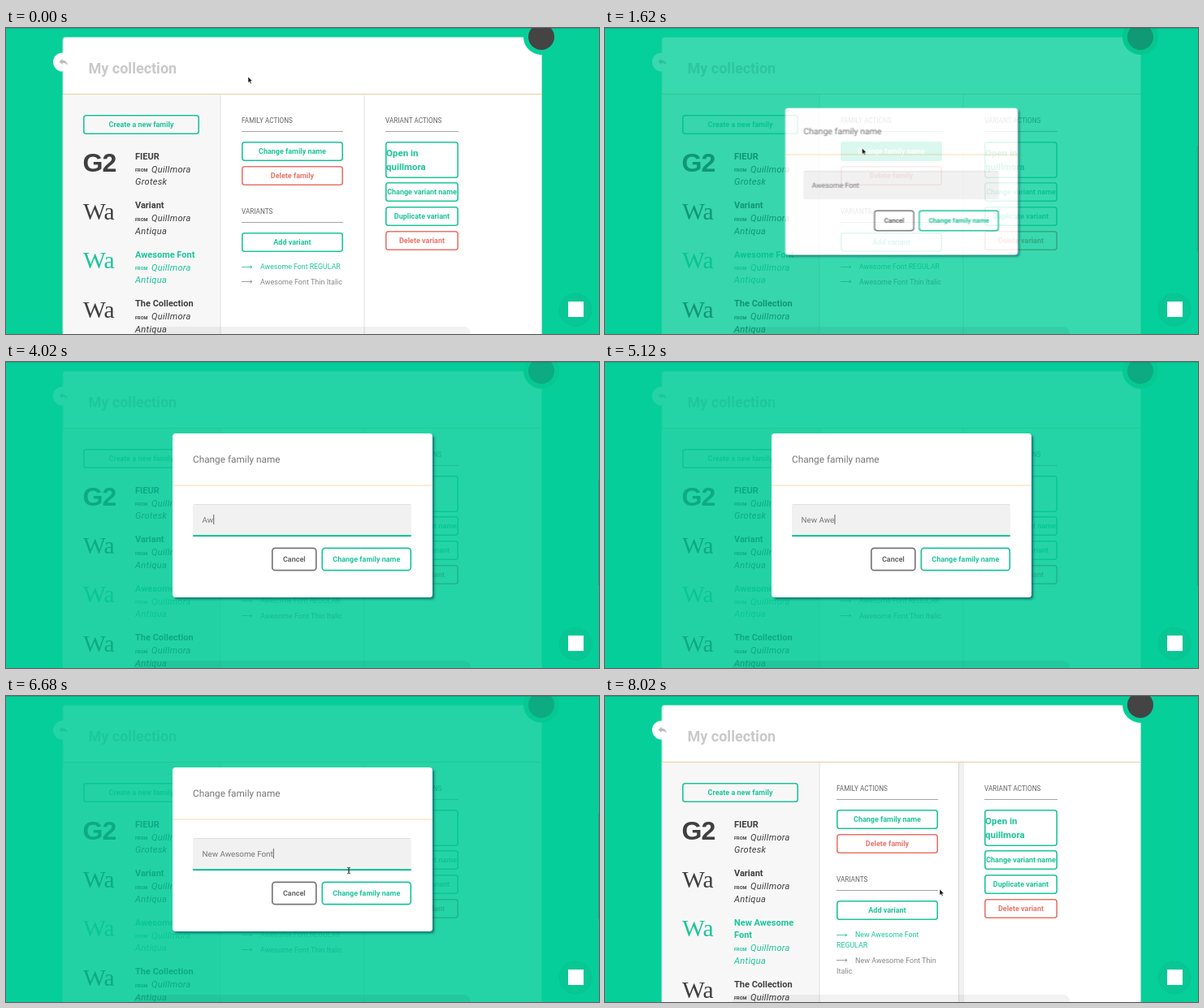
Write an HTML page that moves like this. It is 730 px wide and 377 px high and loops after 8040 ms.

```html
<!DOCTYPE html>
<html lang="en">
<head>
<meta charset="utf-8">
<title>Rename a font family</title>
<style>
html, body { margin: 0; width: 100%; height: 100%; overflow: hidden; background: #06cf9a; }
svg { display: block; width: 730px; height: 377px; font-family: Roboto, "Open Sans", sans-serif; }
text { white-space: pre; }
.bold { font-weight: 600; }
.mid { text-anchor: middle; }
.it { font-style: italic; letter-spacing: .3px; }
.serif { font-family: "Liberation Serif", serif; }
.sans { font-family: "Liberation Sans", sans-serif; font-weight: 700; letter-spacing: -1px; }

.before, .after, .hover, .veil, .residue, .glimpse, .modal, .focus, .fill, .label, .pointer, .arrow, .hand, .beam {
  animation: 8040ms linear infinite;
}
.before { animation-name: before; }
.after { visibility: hidden; animation-name: after; }
.hover { opacity: 0; animation-name: hover; }
.veil { animation-name: veil; }
.residue { mix-blend-mode: multiply; animation-name: residue; }
.glimpse { mix-blend-mode: multiply; animation-name: glimpse; }
.modal { transform-origin: 365px 189px; text-rendering: geometricPrecision; animation-name: modal; }
.focus { animation-name: focus; }
.fill { animation-name: fill; }
.label { animation-name: label; }
.pointer { animation-name: pointer; animation-timing-function: ease-in-out; }
.arrow, .hand, .beam { animation-timing-function: step-end; }
.arrow { animation-name: arrow; }
.hand { animation-name: hand; }
.beam { animation-name: beam; }

@keyframes before { 0%, 94% { visibility: visible; } 94.01%, 100% { visibility: hidden; } }
@keyframes after { 0%, 94% { visibility: hidden; } 94.01%, 100% { visibility: visible; } }
@keyframes hover { 0%, 11.8% { opacity: 0; } 13.6%, 93% { opacity: 1; } 94%, 100% { opacity: 0; } }
@keyframes veil { 0%, 17.9% { opacity: 0; } 20.15% { opacity: .79; } 21.6%, 95.8% { opacity: .88; } 98.6%, 100% { opacity: 0; } }
@keyframes residue { 0%, 17.9% { opacity: 0; } 20.15% { opacity: .2; } 22%, 95.8% { opacity: .13; } 97.6%, 100% { opacity: 0; } }
@keyframes glimpse { 0%, 19.5% { opacity: 0; } 20%, 20.3% { opacity: .15; } 21%, 100% { opacity: 0; } }
@keyframes modal {
  0%, 17.9% { opacity: 0; transform: scale(.75); }
  20.15% { opacity: 1; transform: scale(.894); }
  22.4%, 95.8% { opacity: 1; transform: none; }
  97.6%, 100% { opacity: 0; transform: scale(.8); }
}
@keyframes focus { 0%, 36.1% { opacity: 0; } 38.6%, 93% { opacity: 1; } 94%, 100% { opacity: 0; } }
@keyframes fill { 0%, 85% { opacity: 0; } 87%, 100% { opacity: 1; } }
@keyframes label { 0%, 85% { fill: #1cc49b; } 87%, 100% { fill: #fff; } }
@keyframes pointer {
  0%, 4% { transform: translate(298px, 60px); }
  12.5%, 23.6% { transform: translate(316.5px, 148px); }
  32.3%, 78.4% { transform: translate(315px, 193px); }
  83.08% { transform: translate(422px, 215px); }
  87%, 95.8% { transform: translate(412px, 241px); }
  97.6%, 100% { transform: translate(412px, 238px); }
}
@keyframes arrow { 0% { opacity: 1; } 12% { opacity: 0; } 17.9% { opacity: 1; } 30% { opacity: 0; } 97%, 100% { opacity: 1; } }
@keyframes hand { 0% { opacity: 0; } 12% { opacity: 1; } 17.9% { opacity: 0; } 84.8% { opacity: 1; } 97%, 100% { opacity: 0; } }
@keyframes beam { 0% { opacity: 0; } 30% { opacity: 1; } 41% { opacity: 0; } 79% { opacity: 1; } 84.8%, 100% { opacity: 0; } }
</style>
</head>
<body>
<svg id="stage" viewBox="0 0 730 377"></svg>
<script>
const LOOP = 8040;
const STAGE = '#06cf9a', GREEN = '#1cc49b', RED = '#ea7468', DARK = '#3f3f3f', GRAY = '#777';

const text = (s, x, y, size, fill, cls = '') =>
  `<text x="${x}" y="${y}" font-size="${size}" fill="${fill}" class="${cls}">${s}</text>`;
const box = (x, y, w, h, fill, more = '') =>
  `<rect x="${x}" y="${y}" width="${w}" height="${h}" fill="${fill}" ${more}/>`;
const frame = (x, y, w, h, color) =>
  box(x + .8, y + .8, w - 1.6, h - 1.6, 'none', `rx="3" stroke="${color}" stroke-width="1.6"`);
const button = (s, x, y, w, color = GREEN) =>
  frame(x, y, w, 24, color) + text(s, x + w / 2, y + 15, 9, color, 'bold mid');
const heading = (s, x, y, w) =>
  text(s, x, y, 8.2, '#666') + box(x, y + 10, w, 1, '#a5a5a5');
const dash = (x, y, color) =>
  `<path d="M${x} ${y}h13m-2.5-1.8l2.5 1.8l-2.5 1.8" fill="none" stroke="${color}" stroke-width=".8"/>`;

// One family: sample letters, title lines, then its template
function family(y, title, template, color = DARK, grotesk = false) {
  const sample = grotesk ? text('G2', 94.5, y + 15.8, 32, color, 'sans') : text('Wa', 95, y + 13.7, 29.5, color, 'serif');
  const last = y + (title.length - 1) * 15.7;
  return sample +
    title.map((s, i) => text(s, 159, y + i * 15.7, 11, color, 'bold')).join('') +
    text('FROM', 159, last + 15.5, 5.6, color, 'bold') +
    text('Quillmora', 179, last + 16, 11.1, color, 'it') +
    text(template, 159, last + 31.6, 11.1, color, 'it');
}

function familyColumn(x) {
  return heading('FAMILY ACTIONS', x, 117, 125) +
    button('Change family name', x, 140, 125) +
    button('Delete family', x, 170, 125, RED) +
    heading('VARIANTS', x, 229, 125) +
    button('Add variant', x, 252, 125);
}

const page = `
  ${box(70, 11.5, 589.5, 380, '#fff', 'rx="3" stroke="#a5e8d3"')}
  <circle cx="69.5" cy="42" r="11.5" fill="#fff"/>
  <path d="M65.5 41.5l4-3.6v2.2c4 0 6 1.8 6 5.7c-1.2-2-3-2.7-6-2.7v2.1z" fill="#bbb"/>
  ${box(70, 82, 194, 300, '#f7f7f7')}
  ${box(70, 81, 590, 1, '#e6cfa0')}
  ${box(263.5, 82, 1, 300, '#e0e0e0')}
  ${box(440.5, 82, 1, 300, '#e0e0e0')}
  ${text('My collection', 101.5, 55.5, 18, '#c9c9c9', 'bold')}
  ${button('Create a new family', 95, 107, 143)}
  ${family(161.5, ['FIEUR'], 'Grotesk', DARK, true)}
  ${family(222, ['Variant'], 'Antiqua')}
  <g class="before">
    ${family(282.5, ['Awesome Font'], 'Antiqua', GREEN)}
    ${family(343, ['The Collection'], 'Antiqua')}
    ${familyColumn(290)}
    <g class="hover">
      ${box(290, 140, 125, 24, STAGE, 'rx="3"')}
      ${text('Change family name', 352.5, 155, 9, '#fff', 'bold mid')}
    </g>
    ${dash(290, 294.5, GREEN)}${text('Awesome Font REGULAR', 313, 297, 8.8, GREEN)}
    ${dash(290, 312.5, '#888')}${text('Awesome Font Thin Italic', 313, 315.5, 9, '#888')}
  </g>
  <g class="after">
    ${family(282.5, ['New Awesome', 'Font'], 'Antiqua', GREEN)}
    ${family(358.7, ['The Collection'], 'Antiqua')}
    ${box(435, 82, 6, 300, '#f1f1f1')}${box(435, 82, 1, 300, '#d8d8d8')}
    ${familyColumn(285)}
    ${dash(285, 294.5, GREEN)}${text('New Awesome Font', 308, 297, 8.8, GREEN)}
    ${text('REGULAR', 285, 310, 8.8, GREEN)}
    ${dash(285, 325.5, '#888')}${text('New Awesome Font Thin', 308, 328.5, 9, '#888')}
    ${text('Italic', 285, 342, 9, '#888')}
  </g>
  ${heading('VARIANT ACTIONS', 467, 117, 90)}
  ${frame(467, 140, 90, 45, GREEN)}
  ${text('Open in', 468, 158, 11.5, GREEN, 'bold')}
  ${text('quillmora', 468, 175, 11.5, GREEN, 'bold')}
  ${button('Change variant name', 467, 190, 90)}
  ${button('Duplicate variant', 467, 220, 90)}
  ${button('Delete variant', 467, 250, 90, RED)}
  <circle cx="659" cy="11" r="22" fill="${STAGE}"/>
  <circle cx="659" cy="11" r="16" fill="#444"/>`;

const modal = `<g class="modal">
  ${box(205, 88, 320, 202, '#fff', 'rx="4" filter="url(#shadow)"')}
  ${text('Change family name', 230, 124, 11.8, GRAY)}
  ${box(205, 151.5, 320, 1, '#f8dcaa')}
  ${box(230, 175, 269, 38.5, '#f1f1f1', 'rx="2"')}
  ${box(231, 175, 267, .8, '#dcdcdc')}
  ${box(230, 213, 269, 2.3, GREEN, 'class="focus" rx="1"')}
  <text id="field" x="241.5" y="197.5" font-size="9.8" fill="${GRAY}"></text>
  <rect id="caret" y="188" width=".9" height="12" fill="#555"/>
  ${box(327.8, 229.3, 54, 27.4, '#fff', 'rx="3.5" stroke="#777" stroke-width="1.7"')}
  ${text('Cancel', 354.8, 245.5, 9, '#666', 'bold mid')}
  ${box(389.3, 229.3, 109, 27.4, '#fff', `rx="3.5" stroke="${GREEN}" stroke-width="1.7"`)}
  ${box(388.5, 228.5, 110.5, 29, STAGE, 'class="fill" rx="4"')}
  ${text('Change family name', 443.8, 245.5, 9, GREEN, 'bold mid label')}
</g>`;

const pointer = `<g class="pointer">
  <path class="arrow" d="M0 0v7.4l1.7-1.5l1.2 2.7l1.3-.6l-1.2-2.6h2.3z" fill="#111" stroke="#fff" stroke-width=".5"/>
  <path class="hand" d="M-1-2.5q1-1 1.7 0v2l3 .6q1 .4.8 1.7l-.7 2.7h-4.2l-2.5-3q0-1.2 1.9-.2z" fill="#fff" stroke="#222" stroke-width=".8"/>
  <path class="beam" d="M-2-3.8q2 0 2 1v5.6q0 1-2 1M2-3.8q-2 0-2 1v5.6q0 1 2 1" fill="none" stroke="#333" stroke-width=".9"/>
</g>`;

document.getElementById('stage').innerHTML = `
  <defs>
    <filter id="shadow" x="-10%" y="-10%" width="120%" height="120%">
      <feDropShadow dx="2.5" dy="2.5" stdDeviation="1.3" flood-color="#034" flood-opacity=".5"/>
    </filter>
    <clipPath id="pane"><rect x="222" y="99" width="286" height="179" rx="4"/></clipPath>
  </defs>
  ${box(0, 0, 730, 377, STAGE)}
  <g>${page}</g>
  ${box(0, 0, 730, 377, STAGE, 'class="veil"')}
  <g class="residue">${page}</g>
  ${box(157, 368, 415, 20, '#000', 'rx="8" opacity=".05"')}
  ${modal}
  <g class="glimpse" clip-path="url(#pane)">${page}</g>
  ${box(0, 0, 730, 1, '#355', 'opacity=".3"')}
  ${box(729, 145, 1, 130, '#2a9a78', 'class="veil"')}
  <circle cx="701" cy="347" r="20" fill="#08c794" stroke="#0ab488" stroke-dasharray="1 2"/>
  ${box(692, 337, 19, 19, '#fff')}
  ${pointer}`;

const field = document.getElementById('field');
const caret = document.getElementById('caret');
const OLD = 'Awesome Font', NEW = 'New Awesome Font';

function typed(t) {
  if (t < 3400) return OLD;
  if (t < 4400) return OLD.slice(0, Math.max(0, OLD.length - 1 - Math.floor((t - 3400) / 65)));
  return NEW.slice(0, Math.floor((t - 4400) / 105) + 1);
}

let start;
function draw(now) {
  start ??= now;
  const t = (now - start) % LOOP;
  const value = typed(t);
  if (field.textContent !== value) field.textContent = value;
  const width = value ? field.getComputedTextLength() : 0;
  caret.setAttribute('x', 241.7 + width);
  const blinkOff = t > 6200 && (t - 6200) % 1000 > 500;
  caret.setAttribute('opacity', t > 2900 && t < 7520 && !blinkOff ? 1 : 0);
  requestAnimationFrame(draw);
}
requestAnimationFrame(draw);
</script>
</body>
</html>
```
